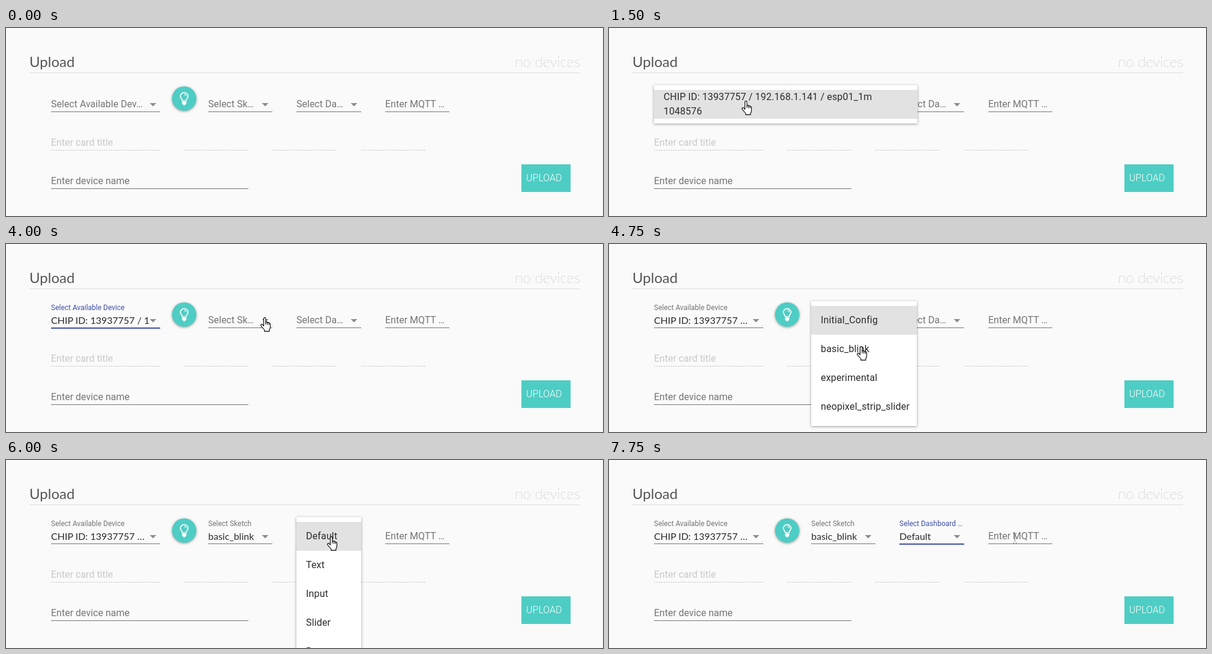
An HTML page that plays this animation: 995 px wide and 313 px high, repeating every 8000 ms.

```html
<!DOCTYPE html>
<html lang="en">
<head>
<meta charset="utf-8">
<title>Upload form</title>
<style>
  html, body { margin: 0; width: 100%; height: 100%; overflow: hidden; background: #fafafa; }
  svg { display: block; width: 995px; height: 313px; }
  text { font: 16px Roboto, sans-serif; fill: #757575; white-space: pre; }
  .lato { font-family: Lato, sans-serif; }
  .value, .option { fill: #2b2b2b; }
  .option { letter-spacing: .01em; }
  .faint { fill: #c9c9c9; }
  .panel { filter: drop-shadow(0 1px 2px rgba(0,0,0,.38)); }
</style>
</head>
<body>
<svg id="stage" viewBox="0 0 995 313" xmlns="http://www.w3.org/2000/svg"></svg>
<script>
const LOOP = 8000, BLUE = '#3f51a5', GREY = '#757575', TEAL = '#4ecdc4';

const text = (x, y, s, cls = '', style = '') =>
  `<text x="${x}" y="${y}" class="${cls}" style="${style}">${s}</text>`;
const rect = (x, y, w, h, fill, more = '') =>
  `<rect x="${x}" y="${y}" width="${w}" height="${h}" fill="${fill}" ${more}/>`;
const dashes = (x, w) =>
  `<path d="M${x} 203.5h${w}" stroke="#c4c4c4" stroke-dasharray="2.4 1.6"/>`;
const arrow = x => `<path d="M${x - 5.5} 125h11l-5.5 5.5z" fill="#8c8c8c"/>`;

const bulb = `
  <circle cx="297" cy="117.5" r="20.3" fill="${TEAL}" style="filter:drop-shadow(0 1px 2px rgba(0,0,0,.4))"/>
  <g fill="none" stroke="#fff" stroke-width="1.7" stroke-linejoin="round" stroke-linecap="round">
    <path d="M294 121.4c0-3-3.3-4.1-3.3-8a6.3 5.8 0 0 1 12.6 0c0 3.9-3.3 5-3.3 8z"/>
    <path d="M297.3 110.6q2.6 0 2.9 2.4" stroke-width="1.1"/>
    <path d="M294.2 123.7h5.6M294.4 125.7h5.2M296 127.5h2" stroke-width="2"/>
  </g>`;

const backdrop =
  text(39, 65, 'Upload', 'lato', 'font-size:24px;fill:#555') +
  text(957, 65, 'no devices', 'lato', 'font-size:24px;font-weight:100;fill:#8a8a8a;text-anchor:end') +
  rect(39, 74, 918, 1, '#dcdcdc') +
  text(75, 196, 'Enter card title', 'faint') +
  dashes(75, 182) + dashes(297, 107) + dashes(444, 108) + dashes(592, 107) +
  text(75, 260, 'Enter device name') + rect(75, 267, 329, 1, GREY) +
  text(632, 132, 'Enter MQTT …') + rect(632, 139, 107, 1, GREY) +
  rect(859, 227, 82, 46, TEAL) +
  text(867, 255, 'UPLOAD', '', 'fill:#fff;font-weight:300') + bulb;

const cursors = {
  hand: '<path d="M5.5 14.5V2.3a1.7 1.7 0 0 1 3.4 0V8q1.8-1 2.8.6 1.8-.7 2.6.9 2.2-.3 2.2 2V16q0 2.6-1.6 4.6V23.4H6.8V21L1.2 14.6Q0 12.6 1.6 11.8q1.3-.5 2.4.8z"/>' +
        '<path d="M8.9 8v4M11.7 9v3.4M14.3 10v2.8" fill="none"/>',
  arrow: '<path d="M.5.5V16.5L4.2 13 7 19.3 9.5 18.2 6.8 12.2H11.8z"/>',
  beam: '<path d="M0 .5h2.5M4.5.5H7M3.5 1.5v13M0 16h2.5M4.5 16H7" fill="none" stroke="#777" stroke-width=".8"/>'
};

// A select: placeholder, then floating label over a value.
function field(x, w, place, label, value, mode) {
  const active = mode === 'active', tint = active ? BLUE : GREY;
  let out = rect(x, 139, w, active ? 2 : 1, tint) + arrow(x + w - 12);
  if (!mode) return out + text(x, 132, place);
  const [y, size] = mode === 'rising' ? [117, 13.3] : [110, 12];
  return out + text(x, y, label, '', `font-size:${size}px;fill:${tint}`) +
    text(x, 133, value, 'lato value');
}

const menu = (x, w, h, items, on) =>
  rect(x, 95, w, h, '#fff', 'class="panel"') +
  rect(x, 103 + on * 48, w, 48, '#e2e2e2') +
  items.map((s, i) => text(x + 16, 132 + i * 48, s, 'option')).join('');

const menus = {
  opening: () => rect(117, 97, 355, 44, '#fff', 'class="panel" opacity=".7"'),
  device: () => menu(75, 439, 64, [], 0) +
    text(91, 120, 'CHIP ID: 13937757 / 192.168.1.141 / esp01_1m', 'option') +
    text(91, 144, '1048576', 'option'),
  sketch: on => menu(337, 176, 208, ['Initial_Config', 'basic_blink', 'experimental', 'neopixel_strip_slider'], on),
  card: () => menu(484, 108, 256, ['Default', 'Text', 'Input', 'Slider', 'Button'], 0)
};

// Each step changes part of the state and holds until the next.
const steps = [
  [0, { device: '', sketch: '', card: '', menu: '', on: 0, cursor: null }],
  [250, { cursor: ['hand', 250, 134] }],
  [500, { cursor: ['hand', 208, 97] }],
  [750, { cursor: ['hand', 220, 109] }],
  [1000, { menu: 'opening', cursor: ['hand', 217, 116] }],
  [1250, { menu: 'device' }],
  [1500, { cursor: ['hand', 221, 121] }],
  [3250, { menu: '', device: 'active', cursor: ['hand', 297, 119] }],
  [3500, { cursor: ['hand', 489, 128] }],
  [3750, { cursor: ['hand', 461, 120] }],
  [4000, { cursor: ['hand', 424, 122] }],
  [4250, { menu: 'sketch', device: 'set', cursor: ['hand', 427, 120] }],
  [4500, { cursor: ['hand', 422, 122] }],
  [4750, { cursor: ['hand', 413, 170] }],
  [5000, { on: 1 }],
  [5250, { menu: '', sketch: 'rising', cursor: ['arrow', 412, 176] }],
  [5500, { sketch: 'set', cursor: ['hand', 510, 143] }],
  [5750, { cursor: ['hand', 531, 128] }],
  [6000, { menu: 'card', cursor: ['hand', 535, 127] }],
  [7250, { menu: '', card: 'rising', cursor: ['beam', 665, 123] }],
  [7500, { card: 'active' }],
  [7750, { cursor: ['beam', 673, 122] }]
];

const stage = document.getElementById('stage');
let shown = -1;

function draw(time) {
  const past = steps.filter(step => step[0] <= time);
  if (past.length === shown) return;
  shown = past.length;
  const s = Object.assign({}, ...past.map(step => step[1]));
  const chip = 'CHIP ID: 13937757 ' + (s.device === 'active' ? '/ 1' : '…');
  let out = backdrop +
    field(75, 182, 'Select Available Dev…', 'Select Available Device', chip, s.device) +
    field(337, 107, 'Select Sk…', 'Select Sketch', 'basic_blink', s.sketch) +
    field(484, 108, 'Select Da…', 'Select Dashboard …', 'Default', s.card);
  if (s.menu) out += menus[s.menu](s.on);
  if (s.cursor) {
    const [kind, x, y] = s.cursor;
    out += `<g transform="translate(${x} ${y})" fill="#fff" stroke="#000" stroke-width="1.1" stroke-linejoin="round">${cursors[kind]}</g>`;
  }
  stage.innerHTML = out;
}

function tick(now) {
  draw(now % LOOP);
  requestAnimationFrame(tick);
}
draw(0);
requestAnimationFrame(tick);
</script>
</body>
</html>
```
